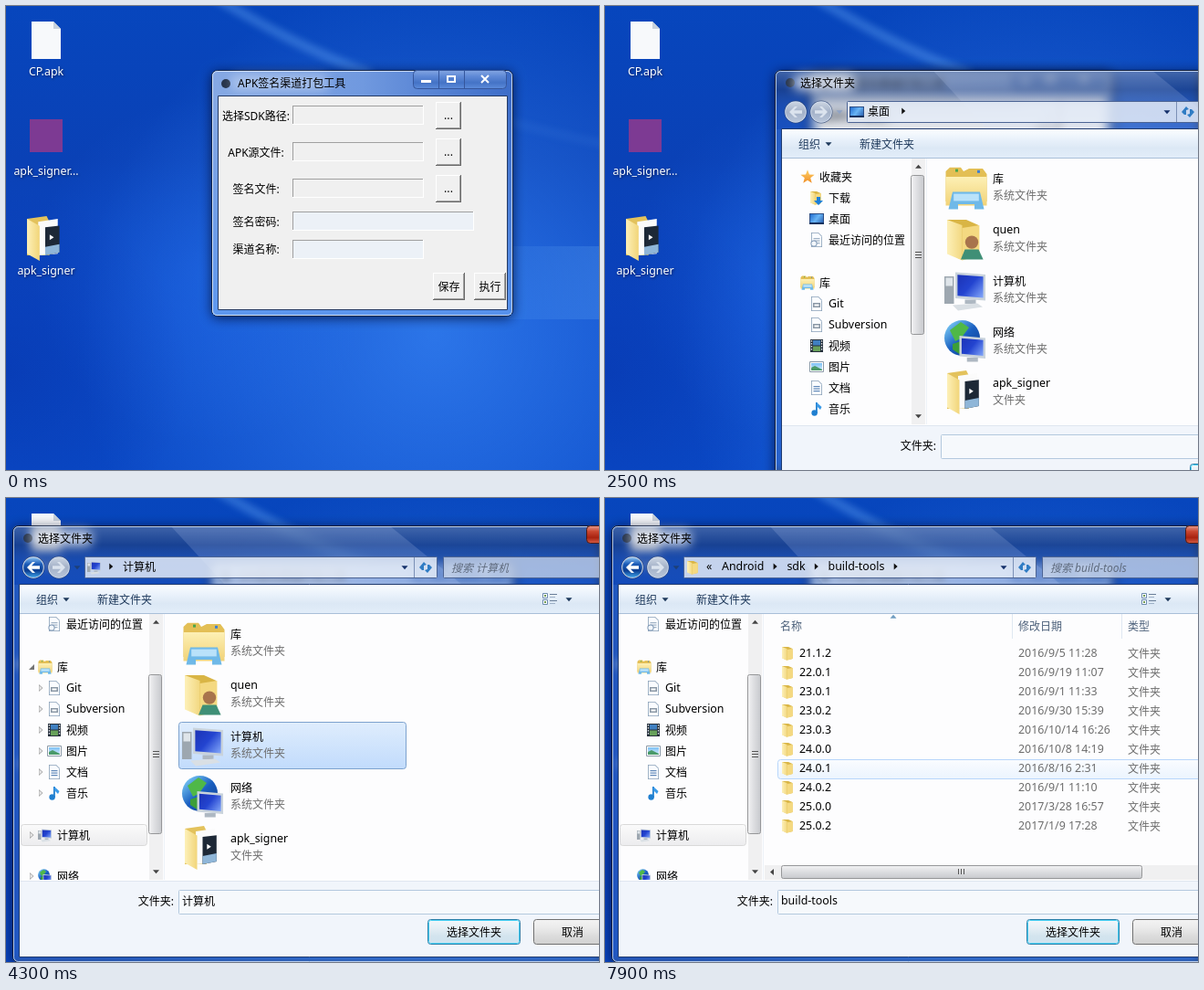
An HTML page with a canvas that plays this animation: 650x508 px, repeating every 8000 ms.

```html
<!DOCTYPE html>
<html lang="zh">
<head>
<meta charset="utf-8">
<title>选择文件夹</title>
<style>
html, body { margin: 0; width: 100%; height: 100%; overflow: hidden; background: #0a44bd }
canvas { display: block }
</style>
</head>
<body>
<canvas width="650" height="508"></canvas>
<script>
const W = 650, H = 508, LOOP = 8000;
const view = document.querySelector('canvas'), stage = view.getContext('2d');
const layer = Object.assign(document.createElement('canvas'), { width: W, height: H });
const layerCtx = layer.getContext('2d');
const FONT = '"Noto Sans","Noto Sans CJK SC","Noto Sans CJK",sans-serif';
const GRAY = '#6d6d6d';
let g = stage;

// ---- drawing helpers ----
function text(s, x, y, color = '#000', align = 'left', style = '') {
  const cjk = /[^\x00-\xff]/.test(s);
  g.font = `${style} ${cjk ? 12 : 12.4}px ${FONT}`;
  g.fillStyle = color;
  g.textAlign = align;
  g.fillText(s, x, y + (cjk ? 5 : 4));
  return g.measureText(s).width;
}
function ramp(x0, y0, x1, y1, ...colors) {
  const r = g.createLinearGradient(x0, y0, x1, y1);
  colors.forEach((c, i) => r.addColorStop(i / (colors.length - 1), c));
  return r;
}
const down = (y, h, ...colors) => ramp(0, y, 0, y + h, ...colors);
function glow(x, y, r, rgb, alpha) {
  const c = g.createRadialGradient(x, y, 0, x, y, r);
  c.addColorStop(0, `rgba(${rgb},${alpha})`);
  c.addColorStop(1, `rgba(${rgb},0)`);
  rect(c, 0, 0, W, H);
}
function rect(fill, x, y, w, h) { g.fillStyle = fill; g.fillRect(x, y, w, h); }
function box(x, y, w, h, fill, stroke, r = 0) {
  g.beginPath();
  g.roundRect(x + .5, y + .5, w - 1, h - 1, r);
  if (fill) { g.fillStyle = fill; g.fill(); }
  if (stroke) { g.strokeStyle = stroke; g.lineWidth = 1; g.stroke(); }
}
function poly(fill, ...p) {
  g.beginPath();
  for (let i = 0; i < p.length; i += 2) g.lineTo(p[i], p[i + 1]);
  g.closePath();
  g.fillStyle = fill;
  g.fill();
}
function disc(fill, x, y, r) {
  g.beginPath();
  g.arc(x, y, r, 0, 7);
  g.fillStyle = fill;
  g.fill();
}
const arrowDown = (x, y, c, s = 3.5) => poly(c, x - s, y - s / 2, x + s, y - s / 2, x, y + s / 2 + .5);
const arrowUp = (x, y, c, s = 3.5) => poly(c, x - s, y + s / 2, x + s, y + s / 2, x, y - s / 2 - .5);
const arrowRight = (x, y, c, s = 3.5) => poly(c, x - s / 2, y - s, x + s / 2 + .5, y, x - s / 2, y + s);
function shadowBox(x, y, w, h) {
  g.save();
  g.shadowColor = 'rgba(0,8,40,.75)';
  g.shadowBlur = 13;
  g.shadowOffsetY = 2;
  box(x, y, w, h, '#1b3566', null, 6);
  g.restore();
}
function glowText(s, x, y, strength) {
  g.save();
  g.filter = 'blur(6px)';
  box(x - 8, y - 9, g.measureText(s).width + 8, 18, `rgba(255,255,255,${strength})`, null, 8);
  g.restore();
  text(s, x, y);
}
const pick = (list, t) => list.filter(e => e[0] <= t).pop();

// ---- icons on a 16 unit grid ----
const screen = (x, y, w, h) => {
  poly('#c9d3dc', x, y, x + w, y + .8, x + w, y + h + .8, x, y + h);
  poly(ramp(x, y, x + w, y + h, '#1a2fb0', '#2344d0', '#8fb4ff'),
    x + .8, y + .9, x + w - .8, y + 1.6, x + w - .8, y + h - .2, x + .8, y + h - .9);
  rect('#aeb8c2', x + w / 2 - 2, y + h + .5, 4, 1.5);
};
const sheet = () => {
  poly('#8aa0b8', 2, 0, 10, 0, 14, 4, 14, 16, 2, 16);
  poly('#fafcff', 2.8, .8, 9.7, .8, 13.2, 4.3, 13.2, 15.2, 2.8, 15.2);
};
const lines = color => [6, 8.5, 11].forEach(y => rect(color, 4.5, y, 7, 1.2));
const icons = {
  folder() {
    poly('#d9b545', 1, 1, 8, 1, 12.5, 3, 12.5, 14, 6, 15.5, 1, 13);
    poly(ramp(1, 0, 9, 0, '#fdf0b8', '#edcd68'), 1, 1, 6.5, 3, 6.5, 15.8, 1, 13.5);
    poly('#f4d981', 6.5, 4, 12.8, 3, 12.8, 14, 6.5, 15.8);
  },
  papers() {
    poly('#e3c25c', 1, 1, 8, 0, 9, 2, 9, 14, 1, 14);
    poly('#fbfbfb', 5, 2, 12, 1, 12, 13.5, 5, 14);
    poly('#1d2836', 7.5, 4, 12.6, 3.4, 12.6, 13, 7.5, 14);
    poly('#8fb6d8', 7.5, 11, 12.6, 10, 12.6, 13, 7.5, 14);
    arrowRight(9.6, 7.6, '#fff', 1);
    poly(ramp(1, 0, 6, 0, '#fdf0b8', '#f0d272'), 1, 1, 5.5, 3.5, 5.5, 16, 1, 13.5);
  },
  user() {
    icons.folder();
    poly('#3f8f76', 6, 15.5, 7.5, 11.8, 12.5, 11.8, 14.2, 15.5);
    disc('#a8744c', 10, 9.2, 2.4);
  },
  lib() {
    poly('#e3bf55', .5, 2, 2, .6, 6, .6, 7, 2, 9, 1, 14, 1, 15.5, 3, 15.5, 13, .5, 13);
    rect('#4ba64b', 4, 1.2, 1, 1); rect('#3e7fd0', 12, 1.6, 1, 1);
    rect(down(4, 10, '#fdf0b5', '#f2d47a'), .5, 4, 15, 10.5);
    poly('#6fb9e8', 3, 9.5, 13, 9.5, 14.5, 15.8, 11, 15.8, 11, 14, 5, 14, 5, 15.8, 1.5, 15.8);
    rect('#b9e2fa', 3.4, 10.2, 9.2, 2.6);
  },
  pc() {
    rect('#9da7b0', 0, 3, 3.5, 10); rect('#dfe5ea', .5, 3.5, 2.5, 3);
    screen(4, 1.5, 11, 9.5);
    poly('#d9dfe4', 3, 13.5, 12, 12.8, 14, 14.2, 5, 15.5);
  },
  net() {
    disc(ramp(1, 1, 12, 13, '#7fd0f8', '#1a5fc0', '#123f90'), 6.5, 6.8, 6.5);
    poly('#4fb848', 2, 4, 6, 1, 9, 3, 6, 7, 4, 8);
    poly('#3c9e3a', 3, 9, 6, 8, 6, 13, 3, 11);
    screen(5.5, 6, 9.5, 7.5);
  },
  desk() {
    rect('#2d4f86', 0, 2, 16, 12);
    rect(ramp(0, 2, 16, 14, '#1560c8', '#69b5f5', '#1c4fa4'), 1, 3, 14, 9);
    rect('#16325e', 0, 12, 16, 2);
  },
  drive() {
    poly('#d9dde1', 2, 6, 14, 6, 16, 9, 0, 9);
    rect(down(9, 4, '#c2c8ce', '#8f979f'), 0, 9, 16, 4.5);
    rect('#4fca58', 12.5, 10.5, 2, 1.2);
  },
  star() {
    const p = [];
    for (let i = 0; i < 10; i++) {
      const r = i % 2 ? 3.4 : 8, a = i * Math.PI / 5;
      p.push(8 + r * Math.sin(a), 8.3 - r * Math.cos(a));
    }
    poly(down(0, 16, '#ffd469', '#ee8720'), ...p);
  },
  save() {
    icons.folder();
    poly('#1d7fd8', 8, 7, 12, 7, 12, 11, 15, 11, 10, 16, 5, 11, 8, 11);
  },
  recent() { sheet(); lines('#9fb1c4'); disc('#7f98b5', 5, 12, 3.6); disc('#f4f8fc', 5, 12, 2.6); },
  code() { sheet(); rect('#8a97a5', 4, 7, 8, 5); rect('#fff', 5.5, 8.5, 5, 2); },
  doc() { sheet(); lines('#5f87b8'); },
  film() {
    rect('#26303c', 1, 1, 14, 14);
    rect('#3f7fc0', 4, 2, 8, 5.5); rect('#67a05a', 4, 8.5, 8, 5.5);
    for (let y = 2; y < 14; y += 3) { rect('#dfe5ea', 1.8, y, 1.3, 1.6); rect('#dfe5ea', 12.9, y, 1.3, 1.6); }
  },
  pic() {
    box(0, 2, 16, 12, '#fff', '#8c9aa8');
    rect(down(4, 8, '#7cc0f5', '#d6ecfb'), 2, 4, 12, 8);
    poly('#4a9a6a', 2, 12, 2, 9, 6, 7, 14, 11, 14, 12);
  },
  note() {
    rect('#1f7fd0', 7, 1, 1.8, 12);
    poly('#3a9ae8', 8, 1, 13.5, 6, 12, 9, 8, 5);
    disc('#1f7fd0', 5.6, 12.5, 3.2);
  }
};
function icon(name, x, y, size) {
  g.save();
  g.translate(x, y);
  g.scale(size / 16, size / 16);
  icons[name]();
  g.restore();
}

// ---- desktop and tool window ----
function label(s, y) {
  g.save();
  g.shadowColor = '#001a50';
  g.shadowBlur = 3;
  g.shadowOffsetX = g.shadowOffsetY = 1;
  text(s, 44, y, '#fff', 'center');
  g.restore();
}
function streak(width, alpha, ...curve) {
  g.beginPath();
  g.moveTo(225, -12);
  g.bezierCurveTo(...curve);
  g.lineWidth = width;
  g.strokeStyle = `rgba(120,185,255,${alpha})`;
  g.stroke();
}
function desktop() {
  rect(down(0, H, '#0746bd', '#0a41b6', '#0b47c4', '#0a49c6'), 0, 0, W, H);
  glow(470, 360, 390, '64,145,255', .62);
  glow(220, 290, 190, '40,120,250', .32);
  glow(0, 400, 200, '0,30,140', .25);
  g.save();
  g.filter = 'blur(4px)';
  streak(9, .32, 270, 15, 330, 50, 400, 74);
  streak(4, .2, 330, 50, 450, 110, 660, 152);
  g.restore();
  rect(ramp(480, 0, 650, 0, 'rgba(120,190,255,0)', 'rgba(120,190,255,.2)'), 480, 263, 170, 80);

  poly('#f7f9fb', 28, 17, 52, 17, 60, 25, 60, 58, 28, 58);
  poly('#c9d2dc', 52, 17, 60, 25, 52, 25);
  rect('#7d3a93', 26, 124, 36, 36);
  icon('papers', 20, 230, 49);
  label('CP.apk', 72);
  label('apk_signer...', 181);
  label('apk_signer', 290);
}
function raised(s, x, y, w, h, pressed) {
  rect('#696969', x, y, w, h);
  rect(pressed ? '#a0a0a0' : '#fff', x, y, w - 1, h - 1);
  rect('#a0a0a0', x + 1, y + 1, w - 2, h - 2);
  rect('#f0f0f0', x + 1, y + 1, w - 3, h - 3);
  const d = pressed ? 1 : 0;
  text(s, x + w / 2 + d, y + h / 2 + d, '#000', 'center');
}
function entry(y, w, fill) {
  rect('#fff', 314, y, w, 21);
  rect('#a0a0a0', 314, y, w - 1, 20);
  rect(fill, 315, y + 1, w - 2, 19);
}
function toolWindow(t) {
  const frame = t < 900 ? ['#86a9e4', '#7099df', '#3c6cc8'] : ['#9db9e8', '#8fafe6', '#6d95da'];
  shadowBox(225, 70, 331, 270);
  box(225, 70, 331, 270, ramp(225, 0, 556, 0, ...frame), '#14284f', 6);
  rect(down(100, 238, 'rgba(90,143,230,0)', 'rgba(90,150,240,.9)'), 227, 100, 327, 238);
  box(226, 71, 329, 268, null, 'rgba(235,245,255,.75)', 5);
  disc('#24324a', 241, 85, 5);
  glowText('APK签名渠道打包工具', 254, 84, .35);
  box(446, 70, 103, 21, down(70, 21, '#86a8e3', '#5f89d6', '#4473c6', '#5f8edc'), '#35569c', 4);
  rect('#35569c', 474, 71, 1, 19);
  rect('#35569c', 502, 71, 1, 19);
  rect('#fff', 455, 81, 11, 3);
  g.lineWidth = 2;
  g.strokeStyle = '#fff';
  g.strokeRect(484, 77, 8, 6);
  g.beginPath();
  g.moveTo(521, 76); g.lineTo(529, 84);
  g.moveTo(529, 76); g.lineTo(521, 84);
  g.stroke();

  box(232, 98, 318, 235, '#f0f0f0', '#243a64');
  [['选择SDK路径:', 120, 109, 144], ['APK源文件:', 160, 149, 144], ['签名文件:', 200, 189, 144],
   ['签名密码:', 236, 225, 199], ['渠道名称:', 266, 256, 144]].forEach(([s, y, top, w], i) => {
    text(s, 274, y, '#000', 'center');
    entry(top, w, i > 2 ? '#ecf1f7' : '#f0f0f0');
    if (i < 3) raised('...', 471, top - 4, 28, 30, !i && t >= 800 && t < 900);
  });
  raised('保存', 468, 292, 35, 30);
  raised('执行', 513, 292, 35, 30);
}

// ---- folder dialog, laid out at its resting place (8, 31) ----
const REST = [8, 31];
const drag = [[0, 226, 71], [2300, 226, 71], [2400, 212, 71], [2500, 187, 71], [2900, 30, 35],
  [3000, 18, 33], [3100, 10, 31], [3200, ...REST], [LOOP, ...REST]];
function dialogPlace(t) {
  const i = drag.findLastIndex(k => k[0] <= t), a = drag[i], b = drag[i + 1];
  const p = (t - a[0]) / (b[0] - a[0]);
  return [1, 2].map(n => Math.round(a[n] + (b[n] - a[n]) * p));
}
const D = '本地磁盘 (D:)';
const crumbs = [[0, 'desk', '桌面'], [4200, 'pc', '计算机'], [5200, 'drive', '计算机', D],
  [6000, 'folder', '计算机', D, 'Android'], [6900, 'folder', D, 'Android', 'sdk'],
  [7600, 'folder', 'Android', 'sdk', 'build-tools']];
const fields = [[0, ''], [3900, '计算机'], [5000, D], [5800, 'Android'], [6700, 'sdk'], [7400, 'build-tools']];
// time, marked row, chosen
const marks = [[0, -1], [3300, 2], [3900, 2, true], [4600, -1], [4800, 1], [5000, 1, true], [5400, -1],
  [5700, 0], [5800, 0, true], [6200, -1], [6500, 1], [6700, 1, true], [7100, -1], [7300, 1],
  [7400, 1, true], [7700, -1], [7900, 6]];
const SYS = '系统文件夹';
const deskTiles = [['lib', '库', SYS], ['user', 'quen', SYS], ['pc', '计算机', SYS], ['net', '网络', SYS],
  ['papers', 'apk_signer', '文件夹']];
const driveTiles = [['C', 21.4], ['D', 86.3], ['E', 112]].map(([c, n]) => ['drive', `本地磁盘 (${c}:)`, n + ' GB 可用']);
const rows = s => s.split(';').map(r => r.split('|'));
const listings = [[0, deskTiles], [4600, driveTiles],
  [5400, rows('Android|2016/9/1 10:57;MSOCache|2016/9/21 11:33;MyDrivers|2016/5/30 9:33;Program Files|2017/1/16 14:48;Program Files (x86)|2017/3/15 13:43;vcData|2016/9/7 9:22')],
  [6200, rows('avd|2016/9/1 10:58;sdk|2017/3/28 16:57')],
  [7100, rows('add-ons|2016/9/1 11:02;build-tools|2017/3/28 16:57;docs|2016/9/1 11:20;extras|2016/9/5 11:28;platforms|2017/3/28 16:50;platform-tools|2017/1/9 17:28;sources|2016/9/19 11:07;tools|2017/1/9 17:25')],
  [7700, rows('21.1.2|2016/9/5 11:28;22.0.1|2016/9/19 11:07;23.0.1|2016/9/1 11:33;23.0.2|2016/9/30 15:39;23.0.3|2016/10/14 16:26;24.0.0|2016/10/8 14:19;24.0.1|2016/8/16 2:31;24.0.2|2016/9/1 11:10;25.0.0|2017/3/28 16:57;25.0.2|2017/1/9 17:28')]];
const nav = [['star', '收藏夹', 69], ['save', '下载', 92, 1], ['desk', '桌面', 115, 1], ['recent', '最近访问的位置', 138, 1],
  ['lib', '库', 185], ['code', 'Git', 208, 1], ['code', 'Subversion', 231, 1], ['film', '视频', 254, 1],
  ['pic', '图片', 277, 1], ['doc', '文档', 300, 1], ['note', '音乐', 323, 1], ['pc', '计算机', 369], ['net', '网络', 414]];

function glass() {
  const w = 800, h = 479, x = REST[0] - 1, y = REST[1] - 1;
  shadowBox(x, y, w, h);
  g.save();
  g.beginPath();
  g.roundRect(x, y, w, h, 6);
  g.clip();
  g.save();
  g.setTransform(1, 0, 0, 1, 0, 0);
  g.filter = 'blur(5px)';
  g.drawImage(view, 0, 0);
  g.restore();
  rect(down(y, 65, 'rgba(105,125,160,.6)', 'rgba(40,62,108,.5)', 'rgba(75,105,160,.2)', 'rgba(110,140,190,.1)'), x, y, w, 65);
  rect('rgba(90,135,205,.3)', x, 95, w, 420);
  poly('rgba(210,225,250,.16)', 180, 30, 420, 30, 500, 95, 240, 95);
  g.restore();
  box(x, y, w, h, null, '#101e3c', 6);
  box(x + 1, y + 1, w - 2, h - 2, null, 'rgba(215,230,252,.8)', 5);
}
function navButton(x, active, flip) {
  disc('rgba(50,72,118,.8)', x, 76, 12.5);
  disc('rgba(225,235,248,.9)', x, 76, 11.8);
  disc(active ? down(65, 22, '#8cc4f4', '#1c5cb8', '#0d3f92', '#3fa4ea') : down(65, 22, '#ccd5e2', '#a3b1c8', '#b9c6da'), x, 76, 10.8);
  g.save();
  g.translate(x, 76);
  g.scale(flip, 1);
  poly(active ? '#fff' : '#dbe3ee', -7, 0, -1, -6, 2, -6, -2, -1.8, 7, -1.8, 7, 1.8, -2, 1.8, 2, 6, -1, 6);
  g.restore();
}
function addressBar(t) {
  const [, kind, ...parts] = pick(crumbs, t);
  navButton(30, t >= 4200, 1);
  navButton(58, false, -1);
  arrowDown(78, 76, t >= 4200 ? '#1d3f78' : '#8fa3c5');
  box(86, 64, 387, 24, 'rgba(230,238,248,.84)', '#4c6494', 1);
  rect('#7b90b6', 447, 65, 1, 22);
  icon(kind, 89, 68, 16);
  let x = kind == 'desk' ? 109 : 128;
  if (t >= 6900) text('«', 111, 75);
  else if (x > 109) arrowRight(115, 75, '#111');
  parts.forEach((s, i) => {
    x += text(s, x, 75) + 12;
    if (kind != 'pc' || i < parts.length - 1) arrowRight(x + (kind == 'desk' ? 3 : 0), 75, '#111');
    x += 13;
  });
  arrowDown(437, 76, '#14306a');
  poly('#2f7cc4', 453, 76, 458, 70, 461, 73, 458, 74, 458, 79, 456, 79);
  poly('#2f7cc4', 467, 76, 462, 82, 459, 79, 462, 78, 462, 73, 464, 73);
  box(479, 64, 240, 24, 'rgba(212,222,238,.72)', '#4c6494', 1);
  text('搜索 ' + parts.at(-1), 488, 76, '#5f6b7e', 'left', 'italic');
}
function grip(x, y, across) {
  for (let i = -3; i <= 3; i += 3) across ? rect('#555', x + i, y - 3, 1, 6) : rect('#555', x - 3, y + i, 7, 1);
}
function navPane(t) {
  const moved = t >= 4200, shift = moved ? 0 : 78;
  const shown = t < 4800 ? Math.min(1, Math.max(0, (t - 3200) / 400)) : Math.max(0, 1 - (t - 4700) / 300);
  g.save();
  g.beginPath();
  g.rect(15, 127, 142, 291);
  g.clip();
  if (moved) box(16, 357, 139, 24, down(357, 24, '#fbfbfb', '#ececee'), '#d9d9d9', 3);
  nav.forEach(([kind, name, base, child], i) => {
    const y = base + shift;
    icon(kind, child ? 45 : 35, y - 8, 16);
    text(name, child ? 66 : 56, y);
    if (child && i < 5) return;
    g.globalAlpha = shown * .75;
    if (kind == 'lib' || kind == 'star') poly('#444', 31, y - 3, 31, y + 3, 25, y + 3);
    else {
      const x = child ? 38 : 28;
      arrowRight(x, y, '#8a8a8a', 4);
      arrowRight(x - .3, y, '#fff', 2.4);
    }
    g.globalAlpha = 1;
  });
  g.restore();
  rect('#f0f0f1', 157, 127, 15, 291);
  arrowUp(164.5, 136, '#444');
  arrowDown(164.5, 409, '#444');
  const top = moved ? 193 : 145;
  box(156, top, 15, 175, ramp(156, 0, 171, 0, '#f4f4f5', '#dcdde0', '#c6c8cc'), '#969799', 2);
  grip(164, top + 87);
}
function rowMark(x, y, w, h, chosen) {
  box(x, y, w, h, chosen ? down(y, h, '#dfedfd', '#c1dbfc') : down(y, h, '#fafcff', '#ebf4fe'), chosen ? '#7da2ce' : '#b8d6fb', 3);
}
function fileList(t) {
  const list = pick(listings, t)[1], [, marked, chosen] = pick(marks, t);
  if (t < 5400) {
    list.forEach(([kind, name, type], i) => {
      const y = 56 * i;
      if (i == marked) rowMark(189, 133 + y, 250, 52, chosen);
      icon(kind, 193, 135 + y, 48);
      text(name, 246, 149 + y);
      text(type, 246, 167 + y, GRAY);
    });
    return;
  }
  [['名称', 192], ['修改日期', 453], ['类型', 573]].forEach(([s, x]) => text(s, x, 140, '#4c607a'));
  rect('#dfe8f2', 446, 127, 1, 27);
  rect('#dfe8f2', 566, 127, 1, 27);
  arrowUp(316, 130, '#6f9cc0', 3.5);
  list.forEach(([name, date], i) => {
    const y = 170 + 21 * i;
    if (i == marked) rowMark(189, y - 10, 600, 22, chosen);
    g.globalAlpha = name == 'MSOCache' ? .5 : 1;
    icon('folder', 193, y - 8, 16);
    g.globalAlpha = 1;
    text(name, 213, y);
    text(date, 453, y, GRAY);
    text('文件夹', 573, y, GRAY);
  });
  rect('#f0f0f1', 175, 402, 500, 16);
  poly('#444', 185, 406, 185, 413, 181, 409.5);
  box(193, 402, 396, 15, down(402, 15, '#f4f4f5', '#dcdde0', '#c6c8cc'), '#969799', 2);
  grip(390, 409, true);
}
function dialog(t) {
  glass();
  box(636, 30, 47, 20, down(30, 20, '#e8a294', '#c8452f', '#a8220f', '#d8634a'), '#4a1a18', 4);
  disc('#24324a', 24, 44, 5);
  glowText('选择文件夹', 35, 44, .75);
  addressBar(t);

  box(14, 94, 788, 409, '#fdfdfe', '#1f3a6e');
  rect(down(95, 31, '#fbfdff', '#eaf2fb', '#dce8f5', '#e2edf9'), 15, 95, 786, 31);
  rect('#a9bfd8', 15, 126, 786, 1);
  text('组织', 33, 111, '#1e395b');
  arrowDown(66, 111, '#1e395b');
  text('新建文件夹', 100, 111, '#1e395b');
  [104, 111].forEach(y => {
    box(588, y, 6, 6, '#fff', '#6d8bae');
    rect('#6f9a55', 590, y + 2, 2, 2);
    rect('#6a7f99', 596, y + 1, 8, 1);
    rect('#9db0c6', 596, y + 4, 6, 1);
  });
  arrowDown(617, 111, '#1e395b');

  navPane(t);
  rect('#eef2f8', 173, 127, 1, 291);
  fileList(t);

  rect('#f1f5fb', 15, 419, 786, 83);
  rect('#dfe6f0', 15, 419, 786, 1);
  text('文件夹:', 184, 441, '#000', 'right');
  box(189, 429, 560, 27, '#f6f9fc', '#b4c9de', 1);
  text(pick(fields, t)[1], 193, 441);
  if (t < 3900 && Math.floor((t - 900) / 500) % 2 == 0) rect('#000', 193, 433, 1, 17);
  box(462, 461, 102, 28, down(461, 28, '#f4f8fb', '#e6eff5', '#d3e4ee', '#cfe2ee'), '#2f7fa8', 3);
  box(463, 462, 100, 26, null, '#48d0f4', 2);
  text('选择文件夹', 513, 475, '#000', 'center');
  box(578, 461, 86, 28, down(461, 28, '#f4f4f4', '#ebebeb', '#dcdcdc', '#d0d0d0'), '#707070', 3);
  text('取消', 621, 475, '#000', 'center');
}

function draw(t) {
  g = stage;
  g.setTransform(1, 0, 0, 1, 0, 0);
  g.globalAlpha = 1;
  desktop();
  toolWindow(t);
  if (t < 900) return;

  const [x, y] = dialogPlace(t);
  g = layerCtx;
  g.setTransform(1, 0, 0, 1, 0, 0);
  g.clearRect(0, 0, W, H);
  g.translate(x - REST[0], y - REST[1]);
  dialog(t);

  // the dialog fades in while tilting up to full size
  const p = Math.min(1, (t - 800) / 500), q = (1 - p) ** 2 / .36;
  stage.globalAlpha = Math.sin(p * Math.PI / 2);
  stage.setTransform(1 - .04 * q, 0, .016 * q, 1 - .046 * q, 27 * q, 28.4 * q);
  stage.drawImage(layer, 0, 0);
}

const start = performance.now();
let last = -1;
function tick() {
  const t = Math.floor((performance.now() - start) % LOOP / 100) * 100;
  if (t != last) draw(last = t);
  requestAnimationFrame(tick);
}
tick();
</script>
</body>
</html>
```
